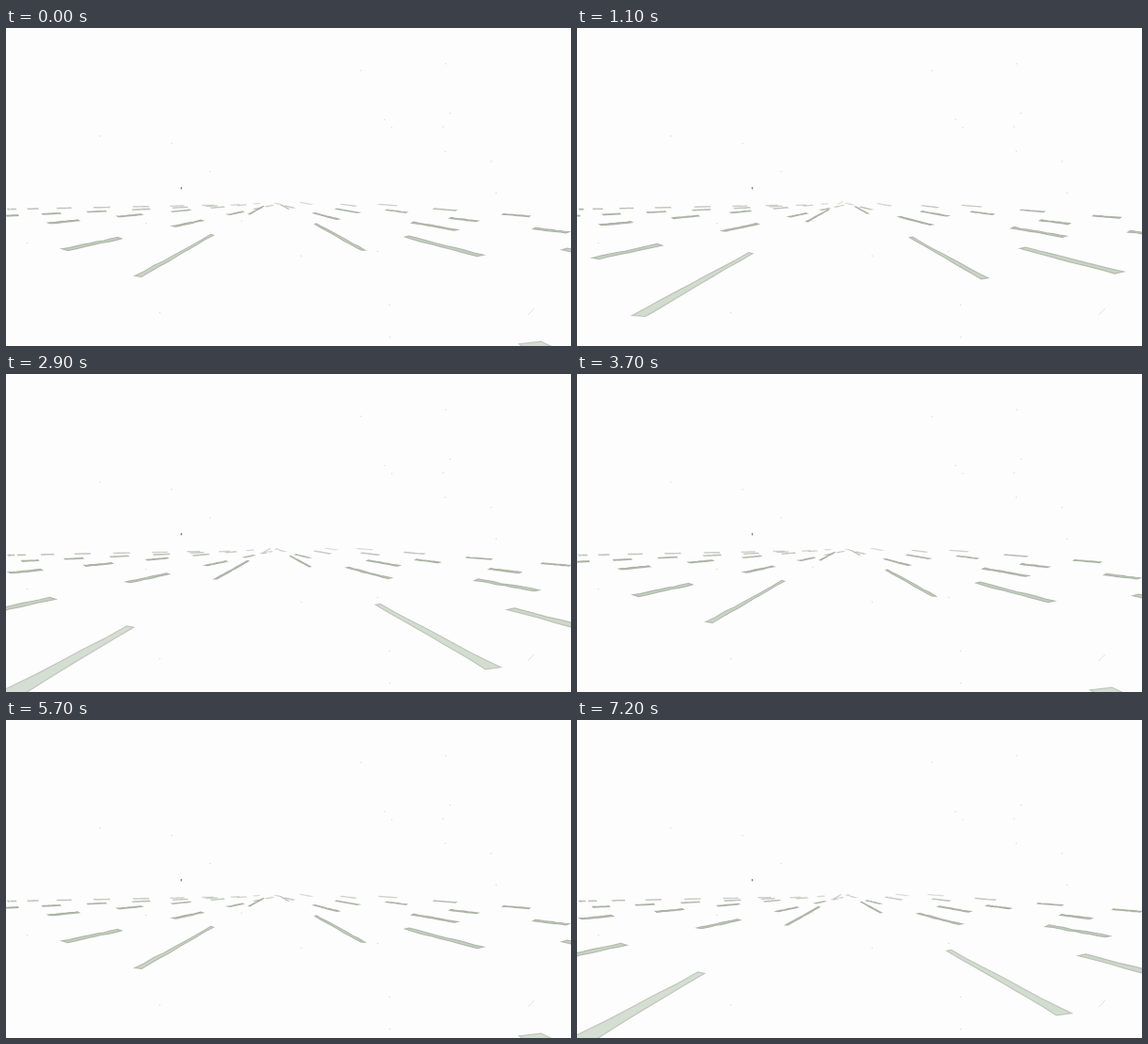
Recreate the animation shown at these times as an HTML page with a canvas. Size 600 by 338 pixels, loop 7.3 s.

```html
<!DOCTYPE html>
<html lang="en">
<head>
<meta charset="utf-8">
<title>Road dashes</title>
<style>
  html, body { margin: 0; width: 100%; height: 100%; overflow: hidden; background: #fdfdfd; }
  canvas { display: block; }
</style>
</head>
<body>
<canvas id="stage" width="600" height="338"></canvas>
<script>
const ctx = document.getElementById('stage').getContext('2d');
const FRAME = 100, LOOP = 7300, POSES = 4, POSES_PER_FRAME = 1.2;
const VANISH_X = 285, HORIZON = 185, SLOWING = .03, STEPS = 8;

// A lane is the line y = base + slope * distance from the vanishing point.
// Its dashes start at `anchor` and spread outwards by e^growth per cycle.
const lane = (side, slope, base, anchor, growth) => ({
  side, slope, base, anchor, growth,
  span: (side < 0 ? .38 : .32) + .05 * growth
});
const lanes = [
  lane(-1, .56, 183, 66, 1.7),
  lane(-1, .215, 188, 77, .79),
  lane(-1, .0935, 185, 141, .42),
  lane(-1, .048, 186, 179, .27),
  lane(-1, .02, 187, 216, .18),
  lane(1, .555, 184, 44, 1.85),
  lane(1, .255, 186, 141, 1.17),
  lane(1, .178, 180.5, 147, .77),
  lane(1, .125, 178.5, 187, .42),
  lane(1, .08, 178.5, 243, .33)
];

function randomFrom(seed) {
  return () => (seed = seed * 16807 % 2147483647) / 2147483647;
}

const distanceAt = ({ anchor, growth }, n) => anchor * Math.exp(growth * n - SLOWING * n * n);

function drawDash(lane, n, seed) {
  const { side, slope, base } = lane;
  const far = distanceAt(lane, n), near = distanceAt(lane, n + lane.span);
  const depth = base + slope * near - HORIZON;
  if (depth < 1 || far > 330) return;
  const random = randomFrom(seed);
  const lean = slope * slope + .05;

  const edgePoint = (k, half) => {
    const u = far + (near - far) * k;
    const y = base + slope * u;
    const d = Math.max(0, y - HORIZON);
    const thickness = .05 * d + (d / 90) ** 4;
    const rough = (random() - .5) * Math.min(1, depth / 60);
    ctx.lineTo(
      VANISH_X + side * (u - half * thickness * slope / lean),
      y + half * thickness * .05 / lean + rough
    );
  };

  ctx.beginPath();
  for (let i = 0; i <= STEPS; i++) edgePoint(i / STEPS, -.5);
  for (let i = STEPS; i >= 0; i--) edgePoint(i / STEPS, .5);
  ctx.closePath();
  const light = Math.min(10, depth / 14);
  ctx.globalAlpha = Math.min(1, .3 + depth / 18);
  ctx.fillStyle = `hsl(110 15% ${75 + light}%)`;
  ctx.strokeStyle = `hsl(95 8% ${66 + light}%)`;
  ctx.lineWidth = 1.2;
  ctx.fill();
  ctx.stroke();
  ctx.globalAlpha = 1;
}

function drawPaper() {
  const random = randomFrom(4711);
  ctx.fillStyle = '#fdfdfd';
  ctx.fillRect(0, 0, 600, 338);
  ctx.fillStyle = '#d8d8d5';
  for (let i = 0; i < 20; i++) ctx.fillRect(random() * 600, random() * 338, 1.2, 1.2);
  ctx.fillStyle = '#85857f';
  ctx.fillRect(185.5, 169, 1.4, 2.4);
  ctx.strokeStyle = '#dde6dc';
  ctx.lineWidth = 1;
  ctx.beginPath();
  ctx.moveTo(554, 305);
  ctx.lineTo(561, 298);
  ctx.stroke();
}

function draw(time) {
  const frame = Math.floor(time % LOOP / FRAME);
  const pose = Math.floor(frame * POSES_PER_FRAME + 1e-6) % POSES;
  drawPaper();
  lanes.forEach((lane, row) => {
    for (let cycle = -4; cycle <= 3; cycle++) {
      drawDash(lane, cycle + pose / POSES, 1000 + row * 97 + cycle * 13 + pose);
    }
  });
}

const start = performance.now();
function tick() {
  draw(performance.now() - start);
  requestAnimationFrame(tick);
}
tick();
</script>
</body>
</html>
```
